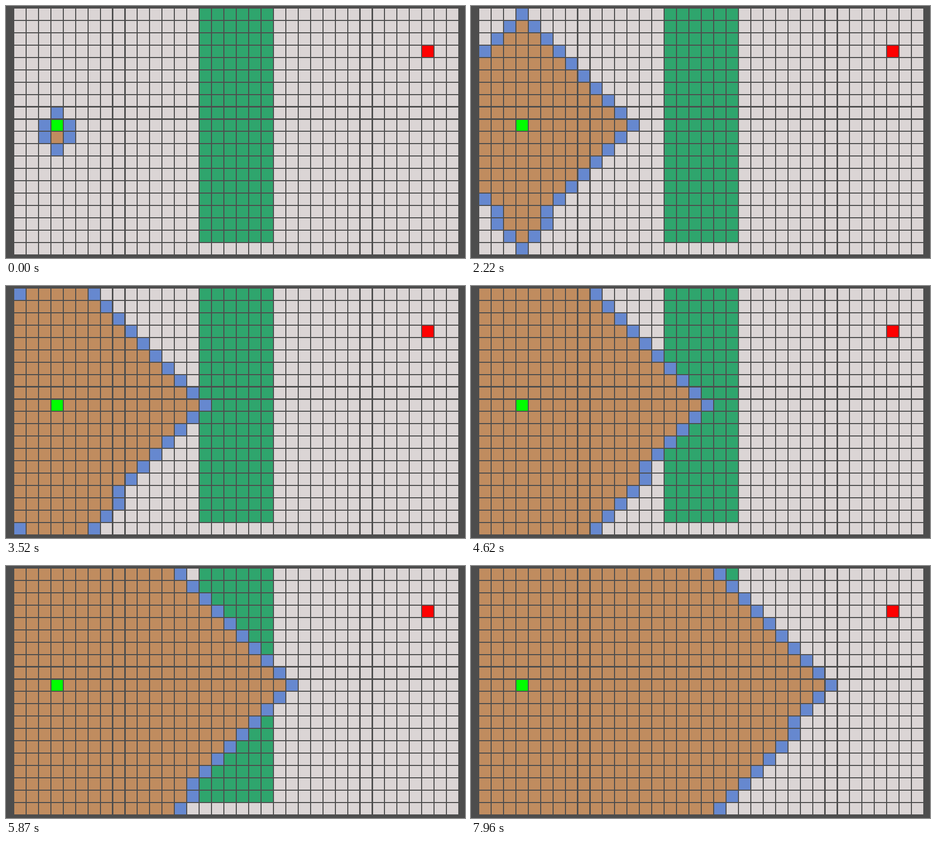
Animation, 889 px wide and 489 px high, one loop 8 s. Source, as an HTML page with a canvas:

```html
<!DOCTYPE html>
<html lang="en">
<head>
<meta charset="utf-8">
<title>Breadth-first search</title>
<style>
  html, body { margin: 0; height: 100%; overflow: hidden; background: #4d4d4d; }
  canvas { display: block; }
</style>
</head>
<body>
<canvas id="grid" width="889" height="489"></canvas>
<script>
const COLS = 36, ROWS = 20, PITCH = 23.95, SIZE = 21.84, LEFT = 16.46, TOP = 5.46;
const LOOP = 8000, HOLD = 230;
const START = { x: 3, y: 9 }, GOAL = { x: 33, y: 3 };
const COLOR = {
  empty: '#dbd5d5', field: '#2fa56d', open: '#6688cf',
  done: '#c08c5f', start: '#00ff00', goal: '#ff0000'
};
const ctx = document.getElementById('grid').getContext('2d');

// Visit order; foundAt is the number of visits after which a cell is known.
function search() {
  const queue = [{ ...START, foundAt: 0 }];
  const seen = new Set([START.y * COLS + START.x]);
  for (let i = 0; i < queue.length; i++) {
    for (const [dx, dy] of [[0, 1], [1, 0], [0, -1], [-1, 0]]) {
      const x = queue[i].x + dx, y = queue[i].y + dy, id = y * COLS + x;
      if (x < 0 || y < 0 || x >= COLS || y >= ROWS || seen.has(id)) continue;
      seen.add(id);
      queue.push({ x, y, foundAt: i + 1 });
    }
  }
  return queue;
}
const cells = search();

// Steps last 50 ms, with a 30 ms step about every fifth time.
const stepTime = k => HOLD + 50 * k - 20 * Math.trunc((k - 0.51) / 5.25);

function visitsAt(t) {
  if (t < HOLD) return 2;
  let k = Math.floor((t - HOLD) / 50);
  while (stepTime(k + 1) <= t) k++;
  return Math.floor(stepTime(k) * 0.06 - 9.9);
}

const at = (cell, p) => cell.x === p.x && cell.y === p.y;

function colorOf(cell, i, visits) {
  if (at(cell, START)) return COLOR.start;
  if (at(cell, GOAL)) return COLOR.goal;
  if (i < visits) return COLOR.done;
  if (cell.foundAt <= visits) return COLOR.open;
  return cell.x > 14 && cell.x < 21 && cell.y < ROWS - 1 ? COLOR.field : COLOR.empty;
}

function draw(visits) {
  ctx.fillStyle = '#4d4d4d';
  ctx.fillRect(0, 0, 889, 489);
  cells.forEach((cell, i) => {
    const x = LEFT + cell.x * PITCH, y = TOP + cell.y * PITCH;
    const x0 = Math.floor(x), y0 = Math.floor(y);
    ctx.fillStyle = colorOf(cell, i, visits);
    ctx.fillRect(x0, y0, Math.floor(x + SIZE) - x0, Math.floor(y + SIZE) - y0);
  });
}

const begin = performance.now();
function frame() {
  draw(visitsAt((performance.now() - begin) % LOOP));
  requestAnimationFrame(frame);
}
frame();
</script>
</body>
</html>
```
